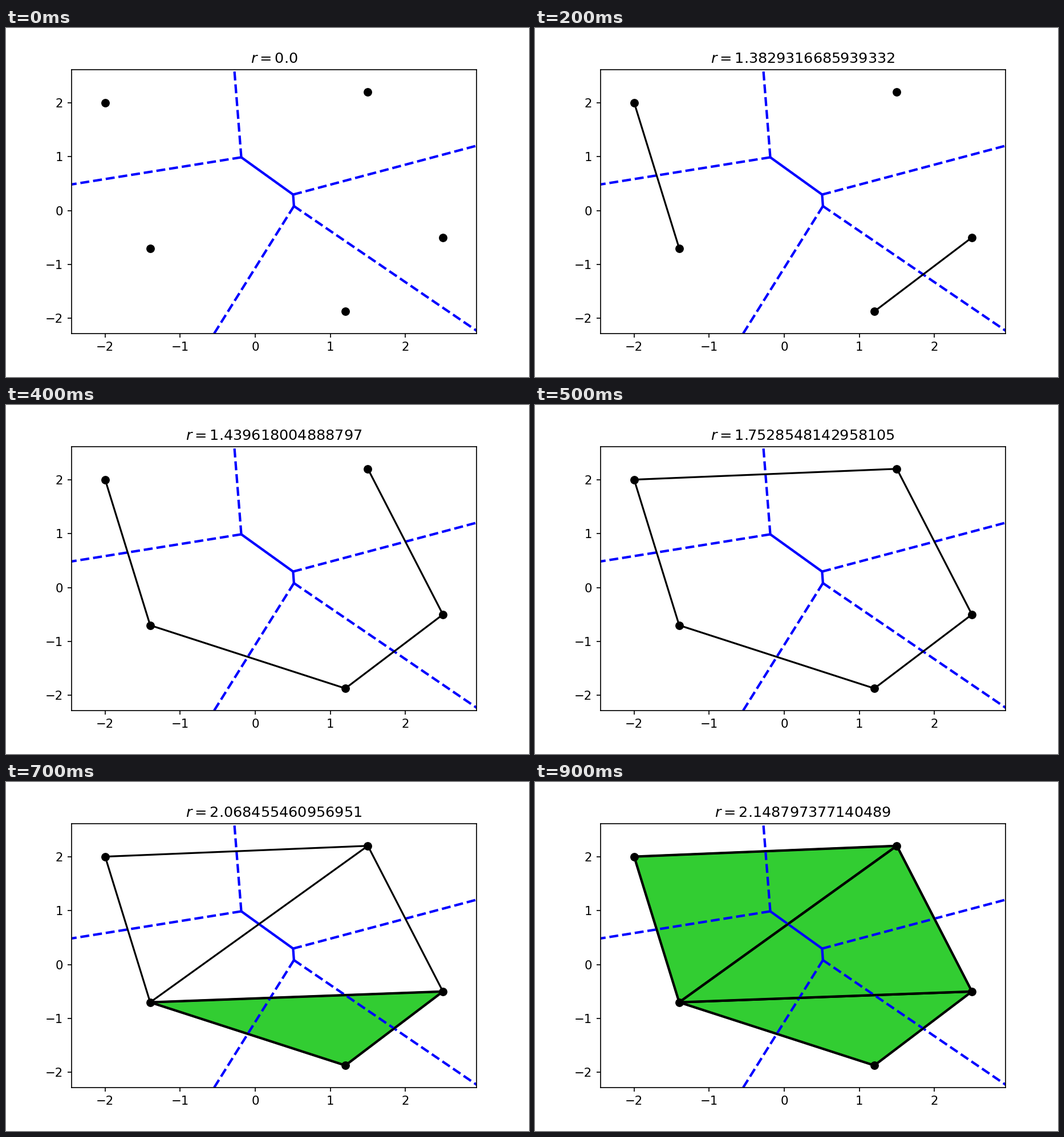
A matplotlib script for the animation above (1 s loop, 917 by 611 pixels).

```python
import numpy as np
import matplotlib.pyplot as plt
from matplotlib.animation import FuncAnimation
from matplotlib.collections import LineCollection
from matplotlib.patches import Polygon

WIDTH, HEIGHT, DPI = 917, 611, 152.8
POINTS = np.array([(-2, 2), (1.5, 2.2), (-1.4, -0.7), (2.5, -0.5), (1.2, -1.87)])
TRIANGLES = [(2, 3, 4), (0, 1, 2), (1, 2, 3)]


def half_length(i, j):
    return float(np.sqrt(np.sum((POINTS[i] - POINTS[j]) ** 2)) / 2)


# Simplices of the alpha complex in order of birth, one per animation step.
BIRTHS = [
    (0.0, ()),
    (half_length(3, 4), (3, 4)),
    (1.3829316685939332, (0, 2)),
    (half_length(2, 4), (2, 4)),
    (1.439618004888797, (1, 3)),
    (half_length(0, 1), (0, 1)),
    (2.0506096654409878, (1, 2)),
    (2.068455460956951, TRIANGLES[0]),
    (2.0776755129687805, TRIANGLES[1]),
    (2.148797377140489, TRIANGLES[2]),
]


def circumcenter(triangle):
    a, b, c = POINTS[list(triangle)]
    return np.linalg.solve(2 * np.array([b - a, c - a]), [b @ b - a @ a, c @ c - a @ a])


def voronoi_ridges():
    """Return the bounded ridges and the rays as lists of segments."""
    owners = {}
    for tri in TRIANGLES:
        for edge in ((tri[0], tri[1]), (tri[0], tri[2]), (tri[1], tri[2])):
            owners.setdefault(edge, []).append(circumcenter(tri))
    middle, reach = POINTS.mean(axis=0), np.ptp(POINTS, axis=0).max()
    bounded, rays = [], []
    for (i, j), centers in owners.items():
        if len(centers) == 2:
            bounded.append(centers)
            continue
        along = POINTS[j] - POINTS[i]
        normal = np.array([-along[1], along[0]]) / np.hypot(*along)
        normal *= np.sign((POINTS[[i, j]].mean(axis=0) - middle) @ normal)
        rays.append([centers[0], centers[0] + normal * reach])
    return bounded, rays


fig, ax = plt.subplots(figsize=((WIDTH + 0.01) / DPI, (HEIGHT + 0.01) / DPI), dpi=DPI)
fig.subplots_adjust(left=0.125, right=0.9, bottom=0.125, top=0.88)

for segments, style in zip(voronoi_ridges(), ("solid", "dashed")):
    ax.add_collection(LineCollection(segments, colors="blue", linewidths=2, linestyles=style))

low, high = POINTS.min(axis=0), POINTS.max(axis=0)
margin = 0.1 * (high - low)
ax.set_xlim(low[0] - margin[0], high[0] + margin[0])
ax.set_ylim(low[1] - margin[1], high[1] + margin[1])
ax.set_autoscale_on(False)

# Each entry holds the step at which the artist appears.
appearing = []
for step, (_, simplex) in enumerate(BIRTHS):
    edges = [simplex] if len(simplex) == 2 else []
    if len(simplex) == 3:
        patch = Polygon(POINTS[list(simplex)], facecolor="limegreen", edgecolor="black", linewidth=2)
        appearing.append((step, ax.add_patch(patch)))
        if simplex == TRIANGLES[0]:
            edges = [(2, 3)]
    for edge in edges:
        line, = ax.plot(*POINTS[list(edge)].T, color="black", linewidth=1.5)
        appearing.append((step, line))

ax.plot(*POINTS.T, "o", color="black", markersize=6, zorder=3)
title = ax.set_title("")


def draw(step):
    for birth, artist in appearing:
        artist.set_visible(birth <= step)
    title.set_text(f"$r={BIRTHS[step][0]}$")
    return [title]


anim = FuncAnimation(fig, draw, frames=len(BIRTHS), interval=100, repeat=True, repeat_delay=0)
plt.show()
```
